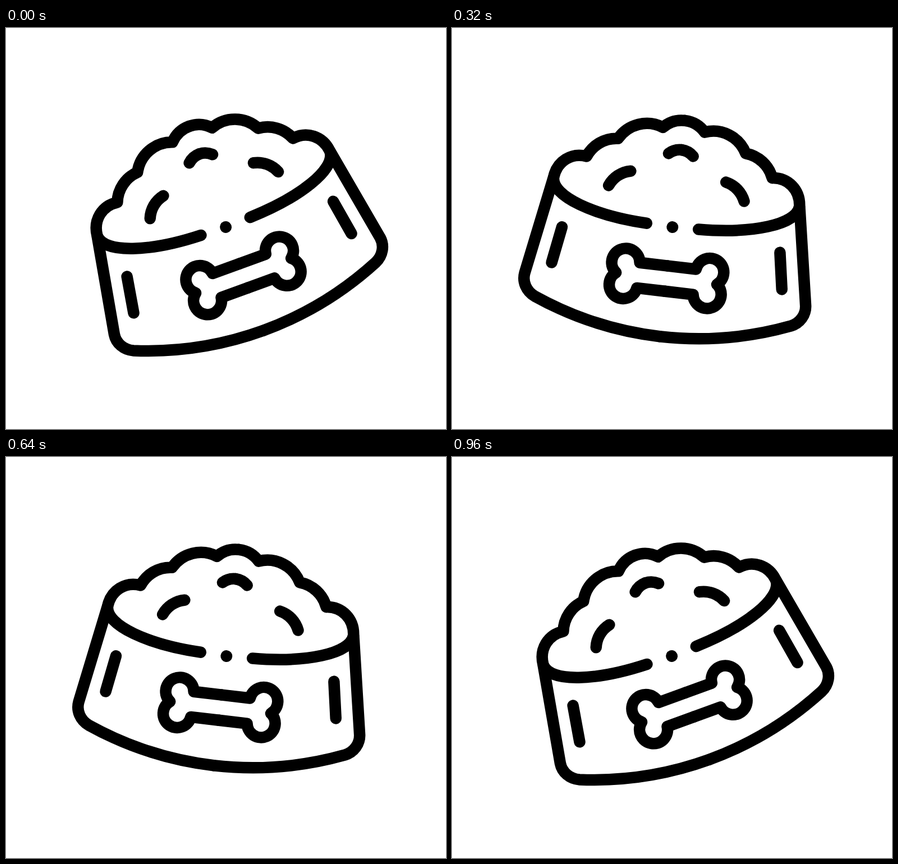
An HTML page that plays this animation: 784x714 px, repeating every 1 s.

```html
<!DOCTYPE html>
<html lang="en">
<head>
<meta charset="utf-8">
<title>Pet bowl</title>
<style>
  html, body { margin: 0; width: 100%; height: 100%; overflow: hidden; background: #fff; }
  svg { display: block; width: 100%; height: 100%; }
  path { fill: none; stroke: #000; stroke-width: 20.5; stroke-linecap: round; stroke-linejoin: round; }
</style>
</head>
<body>
<svg viewBox="0 0 784 714">
  <g id="bowl">
    <g id="half">
      <!-- food, side and base -->
      <path d="M392.5 163.5A51 51 0 0 0 355 180A62 62 0 0 0 278 209A60 60 0 0 0 226 247
               C198 243 175 262 172 290L140.5 466C138 482 147 498 163 505A607 607 0 0 0 392.5 550.5"/>
      <!-- rim -->
      <path d="M172 292C174 325 250 350 346 353"/>
      <!-- side dash -->
      <path d="M197 377L186 442"/>
      <!-- food marks -->
      <path d="M392.5 216A33 33 0 0 0 370.5 225M307 264A50 50 0 0 0 271 294"/>
      <!-- bone -->
      <path d="M392.5 424H342A25 25 0 1 0 302 446.5A25 25 0 1 0 342 469.5H392.5"/>
    </g>
    <use href="#half" transform="translate(785) scale(-1 1)"/>
    <circle cx="392.5" cy="354.5" r="10.5"/>
  </g>
</svg>
<script>
  const bowl = document.getElementById('bowl');
  const STEP = 40, LOOP = 1000, SWING = 12, TILT = 20;

  // Linear rocking between -TILT and TILT, 12 steps each way
  function draw(now) {
    const step = Math.floor(now % LOOP / STEP);
    const angle = TILT - Math.abs(step - SWING) * 2 * TILT / SWING;
    bowl.setAttribute('transform', `rotate(${angle} 392 357)`);
    requestAnimationFrame(draw);
  }
  draw(0);
</script>
</body>
</html>
```
